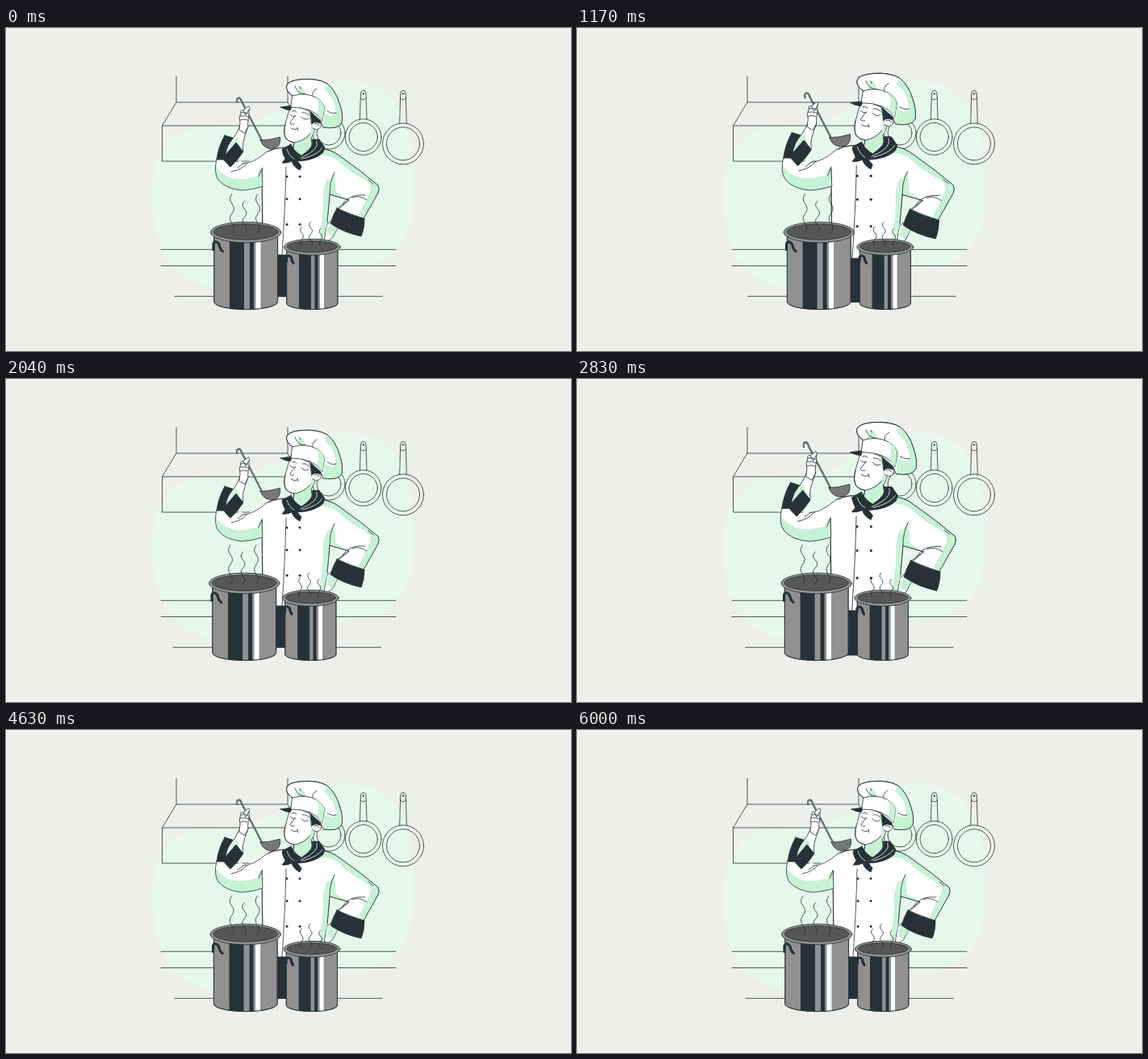
Write an HTML page that moves like this. It is 700 px wide and 400 px high and loops after 6040 ms.

```html
<!DOCTYPE html>
<html lang="en">
<head>
<meta charset="utf-8">
<title>Chef tasting soup</title>
<style>
  html, body { margin: 0; width: 100%; height: 100%; overflow: hidden; background: #edefea; }
  svg { display: block; width: 700px; height: 400px; }
  .line { fill: none; stroke: #263238; stroke-width: .8; stroke-linecap: round; stroke-linejoin: round; }
  .white { fill: #fff; }
  .shade { fill: #c8f2d5; stroke: none; }
  .dark { fill: #263238; }
  .steel { fill: #919191; }
</style>
</head>
<body>
<svg viewBox="0 0 700 400">
  <path fill="#e6f8ec" d="M182 208C182 170 191 143 221 127C252 116 289 126 325 108C352 93 372 66 420 66C470 66 489 96 498 128C505 154 508 190 504 226C500 263 479 298 431 298C398 298 365 324 306 326C254 328 217 312 201 290C188 270 182 238 182 208Z"/>

  <g class="line">
    <path d="M211 60V92H349V60M211 92L193.500 121V165H366V121H193.500M349 92L366 121"/>
    <path d="M192 274.300H483M192 294.500H483"/>
    <g id="pans"></g>
  </g>

  <g id="chef" class="line">
    <path class="dark" d="M322 280H390V332.500H322Z"/>

    <!-- hand on the hip -->
    <path class="white" d="M406 236Q395 245 390 251Q387 257 390 263Q398 267 405 259L411 247Z"/>
    <path class="shade" d="M405 238Q398 247 398 254L404 259L411 247Z"/>

    <!-- jacket -->
    <path class="white" d="M345 148Q330 149 324 154Q315 161 317 174L318 281H391L398 240L401 206L425 213L410 224L443 236L461 204Q463 199 461 195Q440 177 414 159Q403 150 388 149Z"/>
    <path class="shade" d="M402 187L401 206L398 242L390 272L385 272Q394 237 393 205Q396 184 402 187Z"/>
    <path class="shade" d="M388 149Q402 150 414 159Q440 177 461 195Q463 200 460 206L444 235L436 233L450 205Q455 196 446 189Q425 178 413 166Q404 156 385 158Z"/>
    <path class="shade" d="M402 187L407 178L409 203L425 213L401 206Z"/>
    <path class="shade" d="M317 174L318 199L312 196Q312 185 317 174Z"/>
    <path d="M388 149Q403 150 414 159Q440 177 461 195Q463 199 461 204L443 236M407 179Q401 190 401 206L425 213L411 225M401 206L398 240M417 218Q425 205 445 207M429 210Q437 206 447 213M449 188L455 193"/>
    <path d="M347 172Q346 222 342 281M317 174L318 245"/>
    <path class="dark" d="M410 223Q426 232 444 236Q444 249 440 258Q417 253 402 242Q405 232 410 223Z"/>
    <g id="buttons" class="dark" stroke="none"></g>

    <!-- raised arm -->
    <path class="white" d="M290 121Q284 136 273 147L270 164L278 172L294 151Q291 145 300 122Z"/>
    <path class="shade" d="M286 135L274 148L271 164L279 168L290 147Z"/>
    <path class="white" stroke="none" d="M261 162Q257 179 263 188Q272 199 292 201Q307 200 318 196L317 173L326 153Q312 155 298 168L290 164L278 173L270 164Z"/>
    <path class="shade" d="M260 171Q259 183 264 189Q273 199 292 201Q307 200 318 196L317 174Q311 177 312 183Q294 189 280 186Q267 182 260 171Z"/>
    <path d="M345 148Q328 149 322 154Q306 168 293 168M261 162Q257 179 263 188Q272 199 292 201Q307 200 318 196L317 174L313 184M298 168Q293 175 279 178M294 168L287 173"/>
    <path class="dark" d="M271 133L281 136Q273 147 272 157L285 142L294 153Q287 164 278 172L270 163L261 163Q263 147 271 133Z"/>

    <!-- ladle and hand -->
    <path d="M286.500 92Q285 87 288.500 86.500Q291 87 292 91L317 139" stroke-width="2"/>
    <path d="M286.500 92Q285 87 288.500 86.500Q291 87 292 91L317 139" style="stroke:#fff;stroke-width:.5"/>
    <path fill="#777" d="M315 139Q327 139 339.500 135Q341 146 333 149Q320 152 315 139Z"/>
    <path class="white" d="M289 126L290 117Q288 111 291 105Q290 101 294 102L300 97Q303 98 301 102L301 108Q299 119 300 122L296 130Z"/>
    <path d="M291 105Q296 103 300 106M290 109Q295 108 300 110M290 114Q295 112 299 114M294 102L297 108L301 101"/>

    <!-- head -->
    <path class="white" d="M354 94Q349 106 346 119Q343 130 347 137Q351 141 357 142L355 153L366 161L381 151L378 136Q385 128 384 107Z"/>
    <path class="shade" d="M357 142Q369 140 376 130L379 137L381 151L366 159Q356 155 357 142Z"/>
    <path class="shade" d="M379 100L386 118Q382 129 377 134Q379 116 374 106Z"/>
    <path d="M346 119Q343 130 347 137Q351 141 357 142Q369 140 377 131M357 142L355 153M378 136L380 150"/>
    <path class="white" d="M379 117Q384 112 390 117Q392 124 385 126L380 124"/>
    <path d="M382 119Q386 117 388 121"/>
    <path class="dark" d="M377 104L391 109L389 118Q382 115 379 119Z"/>
    <path d="M352 107Q355 111 359 109M366 110Q370 115 375 112M354 103Q357 101 360 104M367 105Q372 104 375 108M358 109L352 117Q352 120 357 119M353 124Q357 127 361 125M361 123L362 127"/>

    <!-- hat -->
    <path class="dark" d="M340 98L355 96L352 102Q345 101 340 98Z"/>
    <path class="white" d="M355 84Q347 79 347.500 72Q349 65 366 63.500Q387 62 398 69Q408 77 413 93Q418 108 416 117Q412 126 393 123L390 115Z"/>
    <path class="shade" d="M398 69Q408 77 413 93Q418 108 416 117Q412 126 393 123L395 105Q411 114 408 99Q406 85 394 76Z"/>
    <path class="shade" d="M360 82Q364 75 361 70Q371 75 371 82L386 88L397 98L394 110Z"/>
    <path d="M355 84Q347 79 347.500 72Q349 65 366 63.500Q387 62 398 69Q408 77 413 93Q418 108 416 117Q412 126 393 123M364 73L365 75M358 72Q361 82 371 82M398 103Q405 107 409 105M385 75Q378 79 380 85"/>
    <path class="white" d="M355 84Q370 79 384 86Q395 92 394 101L392 115Q382 98 353 98Z"/>
    <path class="shade" d="M384 86Q395 92 394 101L392 115L385 106Q390 96 384 86Z"/>

    <!-- scarf -->
    <path class="dark" d="M353 144L342 150Q342 154 346 162L342 167Q348 168 354 165Q356 172 364 176L366 171L361 165Q383 164 393 154L395 148L388 138L379 138Q383 147 366 158Q357 153 353 144Z"/>
    <path style="stroke:#edf9f0" d="M385 140Q389 151 365 161M392 148Q387 157 367 162M348 150Q351 159 357 162"/>
  </g>

  <g id="stove" class="line"><path d="M209 332.300H466.500"/></g>
</svg>
<script>
const LOOP = 6000, SHAKE = 3000;
const byId = id => document.getElementById(id);
const add = (id, markup) => byId(id).insertAdjacentHTML('beforeend', markup);

function pan(x, y, outer, inner) {
  const top = y - outer;
  return `<circle cx="${x}" cy="${y}" r="${outer}"/><circle cx="${x}" cy="${y}" r="${inner}"/>
    <path d="M${x - 4.3} ${top + .5}L${x - 3.3} 81Q${x - 3} 77.500 ${x} 77.500Q${x + 3} 77.500 ${x + 3.3} 81L${x + 4.3} ${top + .5}M${x - 3.3} 87Q${x} 91 ${x + 3.3} 87"/>
    <circle class="dark" cx="${x}" cy="81.500" r=".8"/>`;
}

// A wavy wisp; each half wave is one quadratic segment.
function steam(x, top, bottom, waves, sway) {
  const step = (bottom - top) / waves;
  let d = `M${x} ${top}`;
  for (let i = 0; i < waves; i++) d += `q${i % 2 ? sway : -sway} ${step / 2} 0 ${step}`;
  return `<path d="${d}"/>`;
}

function pot({ x, y, rx, ry, half, bottom, bands, handle }) {
  const left = x - half, right = x + half, drop = ry * .75;
  const edge = px => bottom + drop * Math.sqrt(Math.max(0, 1 - ((px - x) / half) ** 2));
  const band = ([from, to, color]) =>
    `<path fill="${color}" stroke="none" d="M${from} ${y}H${to}V${edge(to)}L${from} ${edge(from)}Z"/>`;
  const body = `M${left} ${y}V${bottom}A${half} ${drop} 0 0 0 ${right} ${bottom}V${y}`;
  return `<path class="steel" d="${body}"/>${bands.map(band).join('')}<path d="${body}"/>
    <ellipse class="steel" cx="${x}" cy="${y}" rx="${rx}" ry="${ry}"/>
    <ellipse fill="#575757" cx="${x}" cy="${y - .5}" rx="${rx - 4}" ry="${ry - 3}"/>
    <path d="${handle}" stroke-width="3.200" style="stroke-width:3.2"/>`;
}

add('pans', pan(400, 130, 20, 15) + pan(442.7, 135, 22.3, 17.6) + pan(492, 143.300, 25.500, 20.500));
for (const y of [184, 211.700, 243.300])
  for (const x of [348, 364]) add('buttons', `<circle cx="${x}" cy="${y}" r="1.500" stroke="none"/>`);

const DARK = '#263238', WHITE = '#fff';
add('stove',
  pot({ x: 297.2, y: 253, rx: 43.800, ry: 12.800, half: 39.400, bottom: 339,
    bands: [[277, 295, DARK], [302, 307, DARK], [309.500, 315.500, WHITE]],
    handle: 'M257 274.500V267Q260 262 264 268Q265 274 268.500 276.500' }) +
  pot({ x: 379.3, y: 271.300, rx: 35, ry: 10, half: 31.600, bottom: 341,
    bands: [[363, 378, DARK], [382.500, 386.500, DARK], [389, 394, WHITE]],
    handle: 'M347.500 289V284Q350 280 353.500 284Q354 289 356 291' }) +
  steam(280, 205.500, 254, 4, 5) + steam(295.500, 214, 254, 4, 5) + steam(312, 205.500, 254, 4, 5) +
  steam(366.500, 246, 270, 3, 4) + steam(377.500, 240, 270, 4, 4) + steam(390, 248, 270, 3, 4));

// Linear interpolation through [position, value] keys.
function track(keys, p) {
  const i = keys.findIndex(([at]) => at > p);
  const [a, from] = keys[i - 1], [b, to] = keys[i];
  return from + (to - from) * (p - a) / (b - a);
}

const pulse = [[0, 1], [.1, 1.1], [.3, 1], [.4, 1], [.5, 1.1], [.6, 1], [1, 1]];
const shake = [0, -1, 2, -4, 4, -4, 4, -4, 2, -1, 0].map((v, i) => [i / 10, v * .8]);

function draw(ms) {
  const scale = track(pulse, ms % LOOP / LOOP);
  byId('chef').setAttribute('transform', `translate(361 200) scale(${scale}) translate(-361 -200)`);
  byId('stove').setAttribute('transform', `translate(${track(shake, ms % SHAKE / SHAKE)} 0)`);
}

const start = performance.now();
function tick() {
  draw((performance.now() - start) % 6040);
  requestAnimationFrame(tick);
}
draw(0);
requestAnimationFrame(tick);
</script>
</body>
</html>
```
